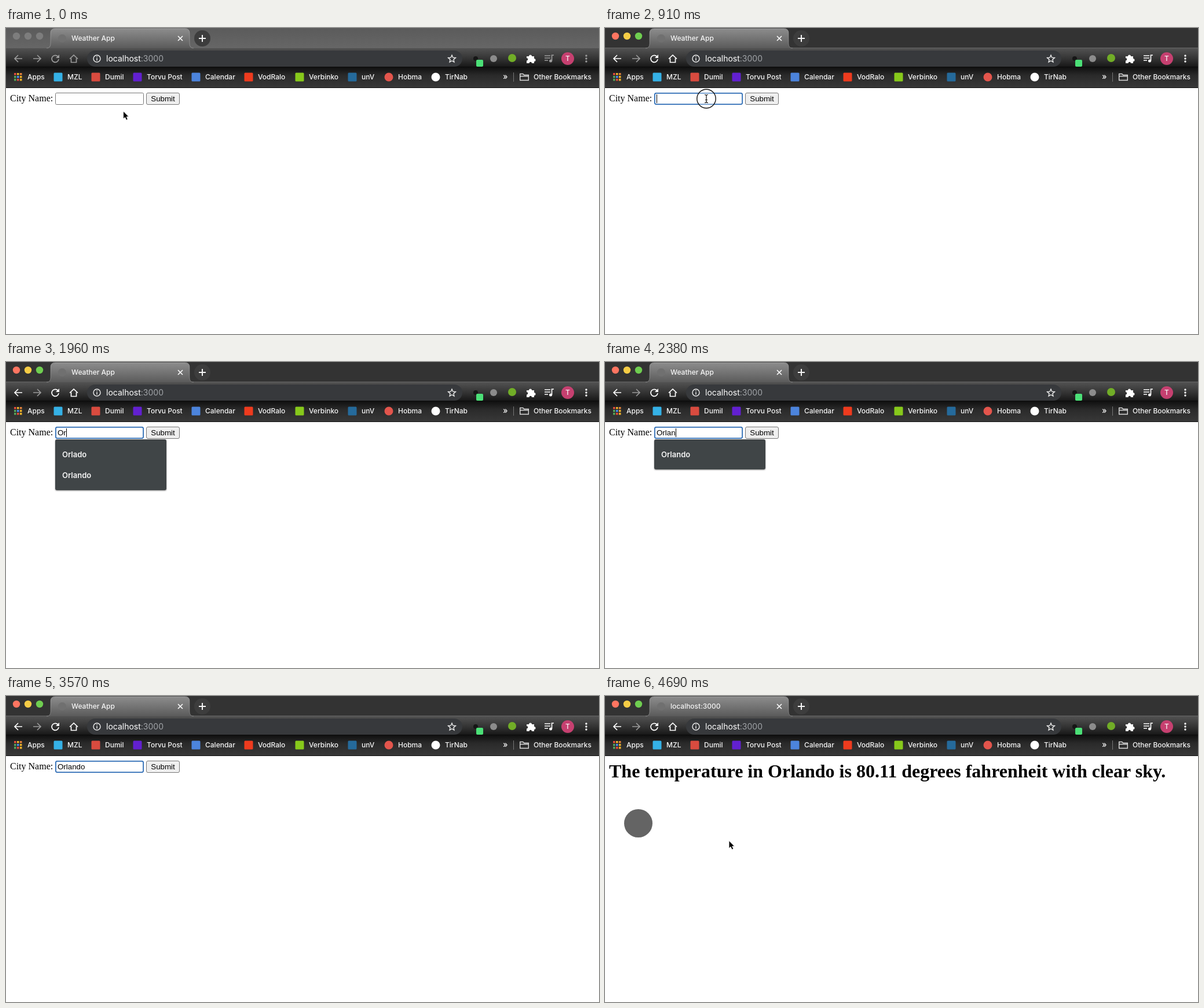
An HTML page that plays this animation: 1024x530 px, repeating every 4760 ms.

```html
<!DOCTYPE html>
<html lang="en">
<head>
<meta charset="utf-8">
<title>Weather App</title>
<style>
  html, body { margin: 0; width: 100%; height: 100%; overflow: hidden; background: #fff; }
  svg { display: block; width: 1024px; height: 530px; --icon: #fff; }
  svg.idle { --icon: #9c9c9c; }
  text { white-space: pre; }
  .ui { font: 500 12px Inter, Roboto, sans-serif; fill: #f6f6f6; }
  .url { font-size: 14px; font-weight: 400; fill: #fff; }
  .item { font-size: 13px; font-weight: 600; }
  .serif { font: 16px "Liberation Serif", serif; }
  .head { font-size: 32px; font-weight: bold; }
  .form { font: 13.333px "Liberation Sans", sans-serif; }
  .line { fill: none; stroke: var(--icon); stroke-width: 1.7; }
  .solid { fill: var(--icon); }
  .idle .focused, svg:not(.idle) .unfocused { display: none; }
</style>
</head>
<body>
<svg id="stage" class="idle" viewBox="0 0 1024 530">
  <defs>
    <linearGradient id="tab" x2="0" y2="1">
      <stop stop-color="#8d8d8d"/><stop offset="1" stop-color="#5b5b5b"/>
    </linearGradient>
    <linearGradient id="strip" x2="0" y2="1">
      <stop stop-color="#5b5b5b"/><stop offset="1" stop-color="#666"/>
    </linearGradient>
    <linearGradient id="bar" x2="0" y2="1">
      <stop stop-color="#545454"/><stop offset=".55" stop-color="#343434"/><stop offset="1" stop-color="#161616"/>
    </linearGradient>
    <linearGradient id="marks" x2="0" y2="1">
      <stop stop-color="#101010"/><stop offset=".4" stop-color="#2a2a2a"/><stop offset="1" stop-color="#383838"/>
    </linearGradient>
    <filter id="shade" x="-10%" y="-10%" width="120%" height="130%">
      <feDropShadow dx="0" dy="1" stdDeviation="1.2" flood-opacity=".45"/>
    </filter>
  </defs>

  <!-- window frame -->
  <rect width="1024" height="35" fill="#333"/>
  <rect class="unfocused" width="1024" height="35" fill="url(#strip)"/>
  <rect y="34" width="1024" height="34" fill="url(#bar)"/>
  <rect y="68" width="1024" height="35" fill="url(#marks)"/>
  <path d="M0 34.5H1024" stroke="#666"/>
  <path d="M0 67.5H1024" stroke="#0b0b0b"/>
  <path d="M0 103.5H1024" stroke="#111"/>
  <path d="M70 35Q77 35 77 27V9Q77 1 85 1H309Q317 1 317 9V27Q317 35 324 35" fill="url(#tab)" stroke="#fff" stroke-opacity=".25"/>
  <g id="lights"></g>
  <circle cx="97" cy="18" r="7" fill="#707070"/>
  <text id="tabName" class="ui" x="113" y="22"></text>
  <path d="M297 14l8 8m0-8l-8 8" stroke="#fff" stroke-width="1.6"/>
  <circle cx="339" cy="18" r="14" fill="#3d3d3d"/>
  <path d="M333 18h12m-6-6v12" stroke="#f5f5f5" stroke-width="2"/>

  <!-- toolbar -->
  <rect x="140" y="39" width="648" height="28" rx="14" fill="#37393c"/>
  <path class="line" d="M28 53H15m6-6l-6 6 6 6"/>
  <path d="M47 53H60m-6-6l6 6-6 6" fill="none" stroke="#999" stroke-width="1.7"/>
  <path class="line" d="M90 50A6 6 0 1 0 91 54"/>
  <path class="solid" d="M92 46v6h-6z"/>
  <path class="line" d="M110 53.500l7-6.500 7 6.500M112.500 52.500v7h9v-7"/>
  <g fill="none" stroke="#eee" stroke-width="1.4">
    <circle cx="157" cy="53" r="6"/>
    <path d="M157 52v4.5m0-7.5v1.6"/>
    <path d="M770 47l1.8 4.2 4.6.4-3.5 3 1 4.5-3.9-2.4-3.9 2.4 1-4.5-3.5-3 4.6-.4z"/>
  </g>
  <text class="ui url" x="173" y="58">localhost<tspan fill="#a1a4a8">:3000</tspan></text>
  <circle cx="811" cy="53" r="4" fill="#161616"/>
  <rect x="812" y="55" width="12" height="12" rx="2" fill="#4be077"/>
  <circle cx="842" cy="53" r="6" fill="#8c8c8c"/>
  <circle cx="874" cy="52" r="7" fill="#71ad27"/>
  <path d="M899 49h4a2.4 2.4 0 1 1 5 0h4v4a2.4 2.4 0 1 1 0 5v3h-4a2.2 2.2 0 0 0-4.5 0H899v-4.5a2.2 2.2 0 0 0 0-4.5z" fill="#fff"/>
  <path class="line" d="M930 48h10m-10 4h10m-10 4h6M942.5 57v-10h3.5"/>
  <circle class="solid" cx="940.5" cy="57" r="2.5"/>
  <circle cx="970" cy="53" r="11" fill="#c64070"/>
  <text class="ui" x="970" y="57" text-anchor="middle">T</text>
  <g class="solid">
    <circle cx="1002" cy="48" r="1.7"/><circle cx="1002" cy="53" r="1.7"/><circle cx="1002" cy="58" r="1.7"/>
  </g>

  <!-- bookmarks -->
  <g id="bookmarks"></g>
  <text class="ui" x="858" y="89" style="font-size:14px">»</text>
  <path d="M876.5 77v16" stroke="#777"/>
  <path d="M887.7 90.5v-11h5l2 2h7.6v9zM888 83.5h14" fill="none" stroke="#ddd" stroke-width="1.4"/>
  <text class="ui" x="911" y="89">Other Bookmarks</text>

  <!-- form page -->
  <g id="form">
    <text class="serif" x="7" y="127">City Name:</text>
    <rect id="field" fill="#fff"/>
    <text id="typed" class="form" x="89" y="127"></text>
    <rect id="caret" y="115" width="1" height="15"/>
    <rect x="242.5" y="112.5" width="57" height="20" rx="2.5" fill="#efefef" stroke="#767676"/>
    <text class="form" x="271" y="127" text-anchor="middle">Submit</text>
    <g id="popup">
      <rect id="panel" x="85" y="134" width="192" rx="3" fill="#414447" filter="url(#shade)"/>
      <g id="items"></g>
    </g>
  </g>

  <!-- result page -->
  <g id="result">
    <text class="serif head" x="7" y="141">The temperature in Orlando is 80.11 degrees fahrenheit with clear sky.</text>
    <circle id="badge" cx="57.5" cy="220.5" r="24.5" fill="#646464"/>
  </g>

  <!-- pointer -->
  <circle id="ring" r="16.2" fill="#fff" fill-opacity=".3" stroke="#111" stroke-width="1.4"/>
  <path id="arrow" d="M0 0V13.5L3 10.7 5.2 15.5 7.8 14.3 5.7 9.8H9.7Z" stroke="#fff" stroke-width=".9"/>
  <g id="beam" fill="none">
    <path d="M-3-7Q0-7 0-5Q0-7 3-7M0-5V5M-3 7Q0 7 0 5Q0 7 3 7M-2 2H2" stroke="#fff" stroke-width="3"/>
    <path d="M-3-7Q0-7 0-5Q0-7 3-7M0-5V5M-3 7Q0 7 0 5Q0 7 3 7M-2 2H2" stroke="#111" stroke-width="1.2"/>
  </g>
</svg>
<script>
const LOOP = 4760, TICK = 70;
const $ = id => document.getElementById(id);
const show = (id, on) => { $(id).style.display = on ? '' : 'none'; };
const attrs = (id, values) => {
  for (const key in values) $(id).setAttribute(key, values[key]);
};

const FOCUS = 490, EDIT = 840, OPEN = 1050, ENTER = 3010, LOADED = 3640, BADGE = 3780;
const CLICKS = [[490, 630], [840, 1050]];
const KEYS = [1680, 1890, 2030, 2170, 2310, 2520, 2660];
const CITY = 'Orlando';
const CITIES = ['Orlado', 'Orlando', 'Paris', 'seattle'];
// time, x, y
const PATH = [[70, 202.5, 144], [420, 175, 122.5], [3920, 175, 122.5], [4060, 177, 133], [4550, 214, 250.5]];

// text x, label, icon x, icon colour, round icon
const BOOKMARKS = [
  [106, 'MZL', 90, '#35b1e6'],
  [171, 'Dumil', 155, '#d94b3f'],
  [243, 'Torvu Post', 227, '#6220d0'],
  [344, 'Calendar', 328, '#4c84dc'],
  [435, 'VodRalo', 419, '#ee3b1e'],
  [523, 'Verbinko', 507, '#87c91b'],
  [614, 'unV', 598, '#256a9b'],
  [677, 'Hobma', 661, '#e3554c', true],
  [758, 'TirNab', 742, '#fff', true]
];

function buildChrome() {
  $('lights').innerHTML = ['#ff7561', '#f5cc45', '#6fce50'].map((color, i) => {
    const dot = (cls, fill) => `<circle class="${cls}" cx="${18 + 20 * i}" cy="14" r="6.2" fill="${fill}"/>`;
    return dot('unfocused', '#7d7d7d') + dot('focused', color);
  }).join('');

  const colors = ['#e94c3d', '#f0b429', '#e8833a', '#57a95b', '#4c8bf5', '#f0b429', '#57a95b', '#e94c3d', '#f0b429'];
  const grid = colors.map((color, i) =>
    `<rect x="${14 + 5 * (i % 3)}" y="${78 + 5 * Math.floor(i / 3)}" width="3.5" height="3.5" fill="${color}"/>`).join('');
  const label = (x, name) => `<text class="ui" x="${x}" y="89">${name}</text>`;
  $('bookmarks').innerHTML = grid + label(37, 'Apps') + BOOKMARKS.map(([x, name, cx, color, round]) =>
    `<rect x="${cx - 7.5}" y="77.5" width="15" height="15" rx="${round ? 7.5 : 1.5}" fill="${color}"/>` + label(x, name)).join('');
}

function pointerAt(t) {
  if (t <= PATH[0][0]) return PATH[0].slice(1);
  const next = PATH.findIndex(p => p[0] > t);
  if (next < 0) return PATH[PATH.length - 1].slice(1);
  const [t0, x0, y0] = PATH[next - 1], [t1, x1, y1] = PATH[next];
  const u = (t - t0) / (t1 - t0), e = u * u * (3 - 2 * u);
  return [x0 + (x1 - x0) * e, y0 + (y1 - y0) * e];
}

function drawForm(t) {
  const editing = t >= EDIT;
  attrs('field', editing
    ? { x: 85.9, y: 112.9, width: 151.2, height: 19.2, rx: 2.5, stroke: '#2d6cb5', 'stroke-width': 1.8 }
    : { x: 85.5, y: 112.5, width: 152, height: 20, rx: 2, stroke: '#767676', 'stroke-width': 1 });

  const count = KEYS.filter(k => k <= t).length;
  const text = CITY.slice(0, count);
  $('typed').textContent = text;
  const since = t - (count ? KEYS[count - 1] : EDIT);
  show('caret', editing && since % 1000 < 500);
  attrs('caret', { x: count ? Math.round(89 + $('typed').getComputedTextLength()) : 89 });

  show('popup', t >= OPEN && t < ENTER);
  const found = CITIES.filter(c => c.toLowerCase().startsWith(text.toLowerCase()));
  attrs('panel', { height: 16 + 36 * found.length });
  $('items').innerHTML = found.map((c, i) =>
    `<text class="ui item" x="97" y="${165 + 36 * i}">${c}</text>`).join('');
}

function drawPointer(t) {
  const [x, y] = pointerAt(t);
  const hidden = t >= KEYS[0] && t < 3990;
  const beam = y < 134;
  const move = { transform: `translate(${x} ${y})` };
  attrs('arrow', move);
  attrs('beam', { ...move, opacity: t >= LOADED ? 0.65 : 1 });
  attrs('ring', move);
  show('arrow', !hidden && !beam);
  show('beam', !hidden && beam);
  show('ring', CLICKS.some(([from, to]) => t >= from && t < to));
}

function render(t) {
  const loaded = t >= LOADED;
  $('stage').classList.toggle('idle', t < FOCUS);
  $('tabName').textContent = loaded ? 'localhost:3000' : 'Weather App';
  show('form', !loaded);
  show('result', loaded);
  show('badge', t >= BADGE);
  if (!loaded) drawForm(t);
  drawPointer(t);
}

let last = -1;
function loop() {
  const t = Math.floor(performance.now() % LOOP / TICK) * TICK;
  if (t !== last) render(last = t);
  requestAnimationFrame(loop);
}
buildChrome();
loop();
</script>
</body>
</html>
```
